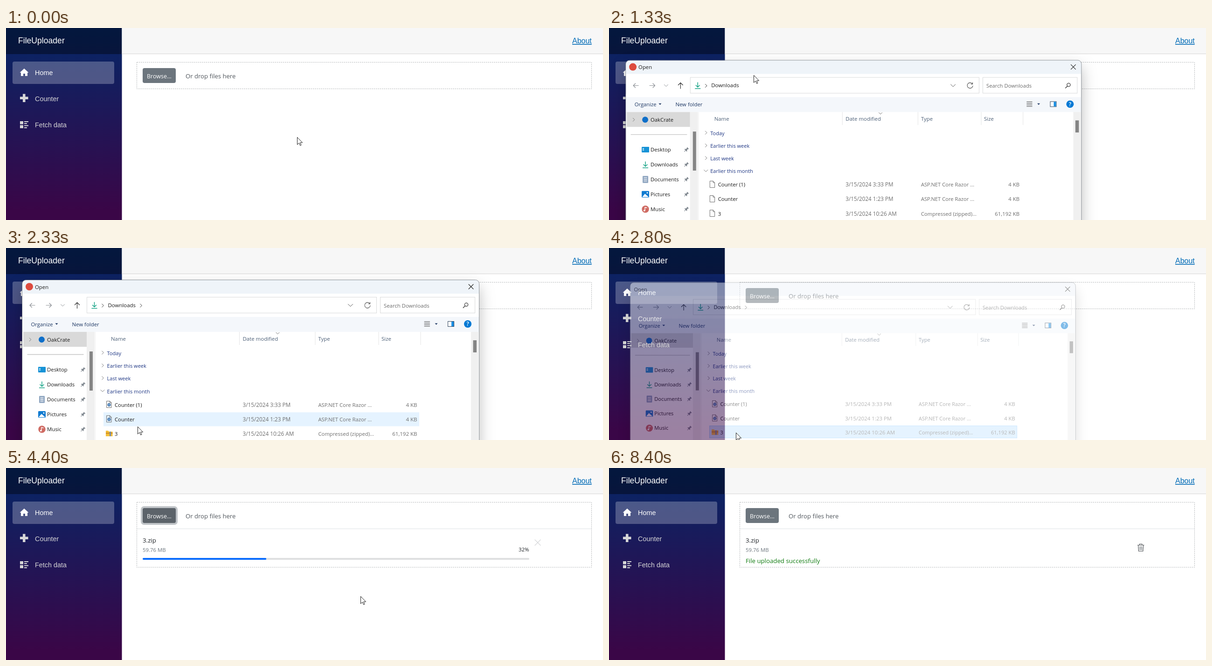
Animation, 1280 px wide and 412 px high, one loop 8870 ms. Source, as an HTML page:

```html
<!DOCTYPE html>
<html lang="en">
<head>
<meta charset="utf-8">
<title>File upload</title>
<style>
html, body { margin: 0; width: 100%; height: 100%; overflow: hidden; background: #fff; }
svg { display: block; font-family: "Open Sans", sans-serif; }
.ui { font-family: "Liberation Sans", Arial, sans-serif; }
.frame { filter: drop-shadow(0 14px 16px rgba(0, 0, 0, .27)); }
.line { fill: none; stroke-linecap: round; stroke-linejoin: round; }
</style>
</head>
<body>
<svg id="stage" width="1280" height="412" viewBox="0 0 1280 412"></svg>
<script>
const LOOP = 8870;
const stage = document.getElementById('stage');

// markup helpers
const text = (x, y, s, size = 11.35, fill = '#1b1b1b', more = '') =>
  `<text x="${x}" y="${y}" font-size="${size}" fill="${fill}" ${more}>${s}</text>`;
const rect = (x, y, w, h, fill, more = '') =>
  `<rect x="${x}" y="${y}" width="${w}" height="${h}" fill="${fill}" ${more}/>`;
const line = (d, stroke, w = 1, more = '') =>
  `<path class="line" d="${d}" stroke="${stroke}" stroke-width="${w}" ${more}/>`;
const shape = (d, fill) => `<path d="${d}" fill="${fill}"/>`;
const right = (x, y, c, r = 3.5) => line(`M${x - r / 2} ${y - r}l${r} ${r}l${-r} ${r}`, c);
const down = (x, y, c, r = 4.5) => line(`M${x - r} ${y - r / 2}l${r} ${r}l${r} ${-r}`, c);
const caret = (x, y) => shape(`M${x - 3} ${y - 1.5}h6l-3 3.2z`, '#1d3763');

function sidebar() {
  const ui = 'class="ui"', dim = '#d7d7d7';
  return rect(0, 0, 248.5, 412, 'url(#side)') + rect(0, 0, 248.5, 56, '#000', 'opacity=".4"') +
    text(26, 33.3, 'FileUploader', 17.6, '#fff', ui) +
    rect(14, 72, 218, 48, '#fff', 'rx="4" opacity=".25"') +
    shape('M39 87L29.5 95.7H32V103H37V98H41V103H46V95.7H48.5Z', '#fff') +
    shape('M36 141.5h5.5v6h6v5.5h-6v6h-5.5v-6h-6v-5.5h6z', dim) +
    shape('M30 200h7v6.5h-7zM30 208.5h7v6.5h-7zM39 200h9v2h-9zM39 204h6v2h-6zM39 208.5h9v2h-9zM39 213h6v2h-6z', dim) +
    text(62, 101, 'Home', 14.4, '#fff', ui) +
    text(62, 157, 'Counter', 14.4, dim, ui) +
    text(62, 213, 'Fetch data', 14.4, dim, ui);
}

function page() {
  const dash = 'stroke="#b5b8ba" stroke-dasharray="2.6 1.75"';
  return rect(248.5, 0, 1031.5, 56, '#f7f7f7') + rect(248.5, 55, 1031.5, 1, '#d6d5d5') +
    text(1214, 33.3, 'About', 16, '#006bb7', 'class="ui" text-decoration="underline"') +
    `<rect id="zone" x="280.5" y="73.5" width="975" height="57" fill="none" ${dash}/>` +
    rect(289, 82, 79, 40, '#c0c4c8', 'id="ring" rx="7"') +
    rect(293, 86, 71, 32, '#6c757d', 'rx="4"') +
    rect(293, 86, 71, 32, '#5c636a', 'id="press" rx="4"') +
    text(302, 107.5, 'Browse...', 12.5, '#fff') +
    text(385, 107.5, 'Or drop files here', 13.1, '#51575d') +
    '<g id="item">' + rect(281, 130, 974, 1, '#dee2e6') +
    text(293, 159.5, '3.zip', 13.3, '#212529') +
    text(293, 180, '59.76 MB', 11.35, '#6c757d') +
    '<g id="load">' + rect(293, 193, 829, 4, '#dfe0e1', 'rx="2"') +
    rect(293, 193, 0, 4, '#0d6efd', 'id="bar" rx="2"') +
    text(1121.5, 179, '', 11.45, '#212529', 'id="pct" text-anchor="end"') +
    line('M1134 154l12 12m0-12l-12 12', '#d6d8da', 1.3) + '</g><g id="done">' +
    text(293, 203.5, 'File uploaded successfully', 13.24, '#107c10') +
    line('M1133.5 165.5h13.5M1137.5 165.5v-2.5h5.5v2.5M1134.7 165.5l.9 13h9.3l.9-13', '#55595d', 1.2) +
    line('M1138 168.5v7.5m2.3-7.5v7.5m2.3-7.5v7.5', '#6a7075') + '</g></g>';
}

// side pane of the dialog
const place = (i, name, icon) => {
  const y = 261 + 32 * i;
  return `<g transform="translate(77 ${y})">${icon}</g>` + text(88, y + 4, name) +
    `<g transform="translate(165 ${y}) rotate(45)">` +
    shape('M-2.5-5h5v1.2h-1v3.3l2 1.8v1h-7v-1l2-1.8v-3.3h-1z', '#7d858d') +
    line('M0 2.3v3.5', '#7d858d') + '</g>';
};
const arrowDown = c => line('M0-6v10M-4 0l4 4l4-4M-5.5 7h11', c, 1.5);
const paper = line('M-5-7h6.5l3.5 3.5v10.5h-10zM1.5-7v3.5h3.5', '#6d6d6d');

const groups = [['Today', 225.5], ['Earlier this week', 253], ['Last week', 280], ['Earlier this month', 307.5]];
const files = [
  ['Counter (1)', '3/15/2024 3:33 PM', 'ASP.NET Core Razor ...', '4 KB'],
  ['Counter', '3/15/2024 1:23 PM', 'ASP.NET Core Razor ...', '4 KB'],
  ['3', '3/15/2024 10:26 AM', 'Compressed (zipped)...', '61,192 KB']
];

function fileRow([name, date, type, size], i) {
  const y = 336.5 + 31.2 * i, soft = '#6d6d6d';
  const code = paper + '<circle cy="1" r="3.2" fill="#6f9fd0" stroke="#35618f"/>';
  const zip = shape('M-7-6h5l2 2h7.5v10h-14.5z', '#f4bf3a') + rect(-7, -2, 14.5, 3, '#d4962a') +
    rect(1, -4, 3, 10, '#7b8da0');
  return `<g transform="translate(221 ${y - 1})"><g class="plain">${paper}</g>` +
    `<g class="typed">${i < 2 ? code : zip}</g></g>` +
    text(233, y + 4, name, 11.25) + text(507.5, y + 4, date, 11.75, soft) +
    text(669.5, y + 4, type, 11.25, soft) + text(881.5, y + 4, size, 11.5, soft, 'text-anchor="end"');
}

function dialog() {
  const grey = '#8d9196', ink = '#333', head = '#4c5f77';
  let s = rect(35, 69, 979, 420, '#fff', 'class="frame" rx="8"') +
    shape('M35 98V77a8 8 0 0 1 8-8H1006a8 8 0 0 1 8 8V98Z', '#eff4f9') +
    '<circle id="mark" cx="50" cy="83" r="8" fill="#dd4b3e"/>' +
    text(62, 87.5, 'Open', 11.35, '#1b1b1b', 'id="title"') +
    line('M992 78l10 10m0-10l-10 10', '#222', 1.1);
  // navigation row
  s += line('M62 123H51m4.5-4.5l-4.5 4.5l4.5 4.5', grey, 1.2) +
    line('M86 123h11.5m-4.5-4.5l4.5 4.5l-4.5 4.5', grey, 1.2) + down(121.5, 123, grey, 4) +
    line('M152.5 129.5v-12.5m-5 5l5-5l5 5', ink, 1.2) +
    rect(173.5, 105.5, 621, 34, '#fff', 'stroke="#d9dadb"') +
    rect(802.5, 105.5, 203, 34, '#fff', 'stroke="#d9dadb"') +
    `<g transform="translate(189.5 122.5)">${arrowDown('#1aa588')}</g>` + right(207.5, 123.5, ink) +
    text(218.5, 127, 'Downloads', 11.45) + `<g id="crumb">${right(289.5, 123.5, ink)}</g>` +
    down(738.5, 123, '#555', 5) +
    line('M780 119.5a6 6 0 1 0 1 4M780.5 116.5v3.5h-3.5', '#555', 1.1) +
    text(810, 127.5, 'Search Downloads', 11.35, '#6b6b6b') +
    '<circle cx="987" cy="121.5" r="3.6" fill="none" stroke="#444" stroke-width="1.3"/>' +
    line('M984.3 124.3l-4 4', '#444', 1.6);
  // tool row
  s += rect(35, 148, 979, 32, '#f4f7fb') + text(53.5, 168, 'Organize', 11.3, '#1d3763') + caret(108.5, 163) +
    text(141.5, 168, 'New folder', 11.4, '#1d3763') +
    line('M897 158h11.5m-11.5 3.3h11.5m-11.5 3.3h11.5m-11.5 3.3h11.5', '#444') + caret(922.5, 163) +
    rect(947.5, 157.5, 13, 11, '#fff', 'stroke="#33475f"') + rect(955, 158, 5, 10, '#1a8fe3') +
    '<circle cx="990" cy="163" r="8" fill="#0078d4"/>' +
    text(990, 167.3, '?', 12, '#fff', 'text-anchor="middle" font-weight="600"');
  // side pane
  s += rect(37, 180, 136, 32, '#d9d9d9') + right(52, 196.5, '#777') +
    '<circle cx="76.5" cy="196.5" r="6.5" fill="#0f6fc9"/>' + text(88, 201, 'OakCrate') +
    rect(173, 180, 17, 240, '#f0f0f0') + rect(179, 222, 7, 84, '#858585') +
    rect(191, 180, 1, 240, '#efefef') + line('M46 228.5H166', '#c4c4c4', 1.3) +
    place(0, 'Desktop', rect(-8, -6, 16, 12, '#1793d6', 'rx="1"') + rect(-6, -3, 3, 1.5, '#fff') + rect(-6, 0, 3, 1.5, '#fff')) +
    place(1, 'Downloads', arrowDown('#1aa588')) +
    place(2, 'Documents', rect(-6, -7.5, 12, 15, '#8ea5c0', 'rx="1"') + line('M-3-3.5h6M-3 0h6M-3 3.5h6', '#fff', 1.3)) +
    place(3, 'Pictures', rect(-8, -7, 16, 14, '#0f7bd1', 'rx="1.5"') + shape('M-7 6l6-7l8 7z', '#fff') + '<circle cx="4" cy="-3" r="1.5" fill="#fff"/>') +
    place(4, 'Music', '<circle r="7.7" fill="#cf6b63"/>' + line('M-1 3v-7l4 1', '#fff', 1.4) + '<circle cx="-2.3" cy="3" r="1.8" fill="#fff"/>');
  // list
  s += rect(195, 0, 801, 26, '#e5f3ff', 'id="hover"') +
    rect(209.5, 384, 676, 26.7, '#cce8ff', 'id="pick" stroke="#99d1ff"');
  for (const [name, x] of [['Name', 225], ['Date modified', 507.5], ['Type', 669.5], ['Size', 805]])
    s += text(x, 199, name, 11.45, head);
  for (const x of [500, 662.5, 798.5, 888.5]) s += rect(x, 180, 1, 28, '#e3e4e5');
  s += down(582.5, 183, '#777', 3.5);
  groups.forEach(([name, y], i) => {
    s += (i < 3 ? right(207.5, y - 1, '#777') : down(207, y - 1, '#777', 4)) + text(216.5, y + 4, name, 11.05, '#1e3683');
  });
  s += files.map(fileRow).join('');
  s += rect(997, 180, 16, 240, '#f0f0f0') + rect(1001.5, 198, 7.5, 26, '#858585');
  return s + rect(34.5, 68.5, 980, 420, 'none', 'rx="8" stroke="#6f767e" stroke-opacity=".75"');
}

stage.innerHTML =
  '<defs><linearGradient id="side" gradientUnits="userSpaceOnUse" x1="0" y1="0" x2="0" y2="392">' +
  '<stop stop-color="#052767"/><stop offset="1" stop-color="#3a0647"/></linearGradient></defs>' +
  sidebar() + page() + `<g id="dialog">${dialog()}</g>` +
  '<path id="cursor" d="M.5.5V16.2L4.2 12.8 6.7 18.2 9 17.2 6.6 12H11.6Z" fill="#fff" stroke="#222"/>';

const $ = id => document.getElementById(id);
const set = (id, key, value) => $(id).setAttribute(key, value);
const show = (el, on) => el.setAttribute('visibility', on ? 'inherit' : 'hidden');
const ramp = (t, a, b) => Math.min(1, Math.max(0, (t - a) / (b - a)));

// pointer path: time, x, y
const path = [
  [0, 624, 234], [50, 624, 234], [330, 430, 150], [570, 310, 101], [1540, 310, 101],
  [1930, 317.5, 295.5], [2500, 272, 395], [2840, 272, 396], [3530, 620, 297], [4300, 760, 275],
  [4480, 760, 275], [5400, 515, 350], [5600, 504, 350], [6900, 504, 350],
  [7270, 472, 351], [7600, 189, 398], [7690, 130, 420], [LOOP, 130, 420]
];
const slope = (i, k) => i < 0 || i > path.length - 2 ? 0 :
  (path[i + 1][k] - path[i][k]) / (path[i + 1][0] - path[i][0]);
function tangent(i, k) {
  const a = slope(i - 1, k), b = slope(i, k);
  return a * b > 0 ? 2 * a * b / (a + b) : 0;
}
function pointer(t) {
  let i = 0;
  while (i < path.length - 2 && t >= path[i + 1][0]) i++;
  const a = path[i], b = path[i + 1], d = b[0] - a[0], u = (t - a[0]) / d, v = 1 - u;
  return [1, 2].map(k => v * v * (1 + 2 * u) * a[k] + u * u * (3 - 2 * u) * b[k] +
    u * v * d * (v * tangent(i, k) - u * tangent(i + 1, k)));
}

const rows = [212, 239.5, 267.5, 294, 321, 352, 383, 414];

function draw(t) {
  const [x, y] = pointer(t);
  set('cursor', 'transform', `translate(${Math.round(x)} ${Math.round(y)})`);

  // button
  const blur = 1 - ramp(t, 8190, 8390);
  const focus = t < 2000 ? ramp(t, 640, 790) : ramp(t, 2870, 3020) * blur;
  set('ring', 'opacity', focus);
  set('press', 'opacity', t < 2000 ? ramp(t, 490, 640) : focus);

  // dialog
  const open = ramp(t, 1165, 1435), close = ramp(t, 2700, 2900);
  const scale = 1 - .05 * (1 - open) ** 3 - .05 * close;
  show($('dialog'), open > 0 && close < 1);
  set('dialog', 'opacity', Math.min(1, open * 2.2) * (1 - close));
  set('dialog', 'transform', `translate(455 289) scale(${scale}) translate(-455 -289)`);
  const ready = t >= 1390;
  show($('crumb'), ready);
  document.querySelectorAll('.plain').forEach(el => show(el, !ready));
  document.querySelectorAll('.typed').forEach(el => show(el, ready));
  show($('mark'), close === 0);
  set('title', 'x', close > 0 ? 43 : 62);

  // row under the pointer, slightly late
  const hy = pointer(Math.max(0, t - 60))[1];
  const row = rows.findIndex((top, i) => hy >= top && hy < rows[i + 1]);
  const picked = t >= 2640;
  show($('hover'), t > 1600 && row >= 0 && !picked);
  if (row >= 0) {
    const file = row > 3;
    set('hover', 'x', file ? 209 : 195);
    set('hover', 'width', file ? 677 : 801);
    set('hover', 'y', rows[row] + .5);
    set('hover', 'height', rows[row + 1] - rows[row] - 1);
  }
  show($('pick'), picked);

  // upload
  const listed = t >= 3000, done = t >= 7230;
  const pct = Math.floor(Math.min(100, Math.max(0, 32.5 + (t - 4400) * .02428)));
  show($('item'), listed);
  set('zone', 'height', listed ? 139.5 : 57);
  show($('load'), !done);
  show($('done'), done);
  set('bar', 'width', 8.285 * pct);
  $('pct').textContent = pct + '%';
}

const start = performance.now();
function tick() {
  draw((performance.now() - start) % LOOP);
  requestAnimationFrame(tick);
}
tick();
</script>
</body>
</html>
```
